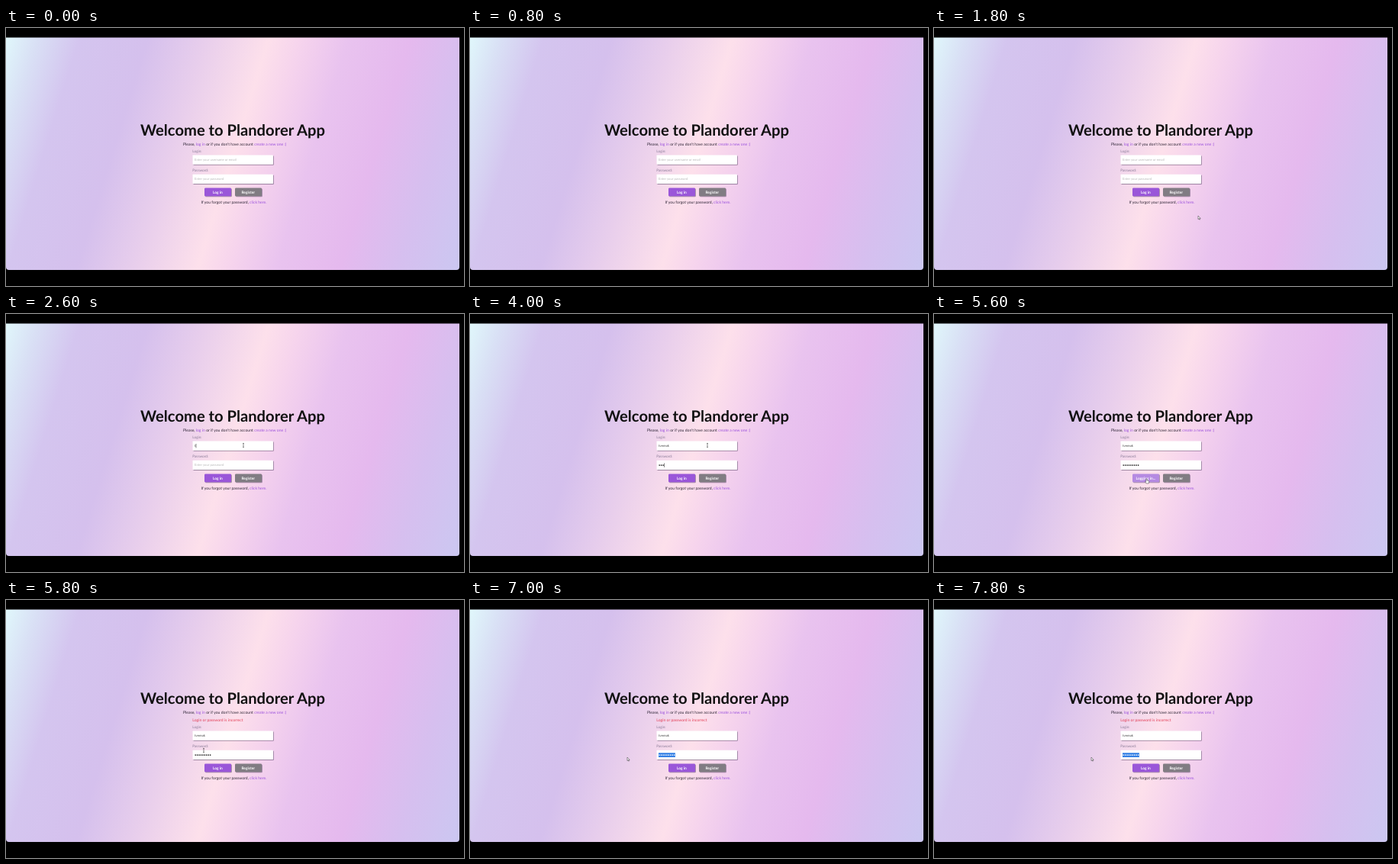
These frames come from a looping animation (600 by 338 pixels, 8000 ms). An HTML page:

```html
<!DOCTYPE html>
<html lang="en">
<head>
<meta charset="utf-8">
<title>Login form</title>
<style>
html, body { margin: 0; width: 100%; height: 100%; overflow: hidden; background: #000; }
svg { display: block; width: 100vw; height: 100vh; }
text { font: 5.08px Lato, sans-serif; fill: #2b2233; text-rendering: geometricPrecision; white-space: pre; }
.title { font-size: 20.2px; font-weight: 700; fill: #111; text-anchor: middle; }
.link { fill: #9a4fdc; }
.label { font-size: 4.7px; fill: #8b7c98; }
.hint { font-size: 4.27px; fill: #b8b8b8; }
.value { font-size: 4.27px; fill: #444; }
.btn { font-size: 4.9px; font-weight: 700; fill: #fff; text-anchor: middle; }
.error { fill: #e23a52; }
</style>
</head>
<body>
<svg viewBox="0 0 600 338">
  <defs>
    <linearGradient id="sky" gradientUnits="userSpaceOnUse" x1="0" y1="12" x2="629.5" y2="207.1">
      <stop offset="0" stop-color="#e0f7fb"/>
      <stop offset=".06" stop-color="#d9e0f5"/>
      <stop offset=".14" stop-color="#d4c5ef"/>
      <stop offset=".27" stop-color="#d5c0ed"/>
      <stop offset=".38" stop-color="#e8ceec"/>
      <stop offset=".5" stop-color="#fde0eb"/>
      <stop offset=".56" stop-color="#f6d4ed"/>
      <stop offset=".65" stop-color="#e9c3ef"/>
      <stop offset=".77" stop-color="#e5b9ee"/>
      <stop offset=".88" stop-color="#d6bfef"/>
      <stop offset="1" stop-color="#cbc7f1"/>
    </linearGradient>
    <filter id="shade" x="-10%" y="-30%" width="120%" height="180%">
      <feDropShadow dx=".8" dy=".9" stdDeviation=".7" flood-color="#332244" flood-opacity=".5"/>
    </filter>
  </defs>
  <rect width="600" height="338"/>
  <path d="M0 12.5H594V313a4 4 0 0 1-4 4H4a4 4 0 0 1-4-4z" fill="url(#sky)"/>

  <g id="head">
    <text class="title" x="297" y="141">Welcome to Plandorer App</text>
    <text x="232" y="153.6">Please, <tspan class="link">log in</tspan> or if you don't have account <tspan class="link">create a new one :)</tspan></text>
  </g>
  <text id="error" class="error" x="244.3" y="158.6">Login or password is incorrect</text>

  <g id="form">
    <text class="label" x="244.3" y="162.8">Login:</text>
    <rect x="244.5" y="166.5" width="105.5" height="12.3" rx=".8" fill="#fff" filter="url(#shade)"/>
    <text id="login" x="247" y="174.2"></text>
    <text class="label" x="244.3" y="188">Password:</text>
    <rect x="244.5" y="191.8" width="105.5" height="12.3" rx=".8" fill="#fff" filter="url(#shade)"/>
    <text id="passHint" class="hint" x="247" y="199.4">Enter your password</text>
    <rect id="select" y="195.3" height="5.6" fill="#2b7be4"/>
    <g id="dots"></g>
    <rect id="caret" width=".5" height="5.4" fill="#111"/>
    <rect id="logBtn" x="260" y="209.5" width="35" height="10.8" rx="1.3" filter="url(#shade)"/>
    <text id="logText" class="btn" x="277.4" y="216.7"></text>
    <rect id="regBtn" x="300" y="209.5" width="35" height="10.8" rx="1.3" filter="url(#shade)"/>
    <text id="regText" class="btn" x="317.3" y="216.7">Register</text>
    <text x="255.6" y="229.7">If you forgot your password, <tspan class="link">click here.</tspan></text>
  </g>

  <g id="pointer" stroke-linejoin="round">
    <path id="arrow" d="M0 0V4.6L1.1 3.6 1.8 5.2 2.5 4.9 1.8 3.4H3.2z" fill="#fff" stroke="#222" stroke-width=".45"/>
    <path id="beam" d="M-1-2.6Q0-2.6 0-2.1Q0-2.6 1-2.6M0-2.1V2.1M-1 2.6Q0 2.6 0 2.1Q0 2.6 1 2.6" fill="none" stroke="#222" stroke-width=".55"/>
    <path id="hand" d="M-.6 0Q0-.7.6 0V2L2.9 2.6Q3.4 2.8 3.3 3.4L2.7 6H-.4L-2 3.6Q-1.6 2.8-.6 3.5z" fill="#fff" stroke="#222" stroke-width=".45"/>
  </g>
</svg>
<script>
const LOOP = 8000, STEP = 200;
const USER = 'tvemok', DOT_GAP = 2.43, TEXT_X = 247;
const FAIL_AT = 5800, CLICK_AT = 5400;

// time, x, y
const PATH = [
  [1600, 372, 306], [2000, 320, 186], [2200, 311, 172], [4400, 311, 172],
  [4800, 302, 216], [5000, 285, 216], [5200, 279, 216], [5600, 278.5, 216],
  [5800, 259, 197], [6200, 277, 203], [6400, 277, 203], [7000, 206, 206]
];

const el = {};
document.querySelectorAll('[id]').forEach(n => el[n.id] = n);
const set = (n, attrs) => { for (const k in attrs) n.setAttribute(k, attrs[k]); };
const show = (n, on) => set(n, { visibility: on ? 'visible' : 'hidden' });
const clamp = (v, lo, hi) => Math.max(lo, Math.min(hi, v));

const dots = Array.from({ length: 9 }, (_, i) => {
  const dot = document.createElementNS('http://www.w3.org/2000/svg', 'circle');
  set(dot, { cx: TEXT_X + 1.2 + i * DOT_GAP, cy: 198.1, r: .85 });
  return el.dots.appendChild(dot);
});

function pointerAt(t) {
  const next = PATH.findIndex(p => p[0] > t);
  if (next < 0) return PATH[PATH.length - 1].slice(1);
  if (next === 0) return PATH[0].slice(1);
  const [t0, x0, y0] = PATH[next - 1], [t1, x1, y1] = PATH[next];
  const k = (t - t0) / (t1 - t0);
  return [x0 + (x1 - x0) * k, y0 + (y1 - y0) * k];
}

function draw(t) {
  const failed = t >= FAIL_AT, shift = failed ? 5 : 0;
  set(el.head, { transform: `translate(0 ${-shift})` });
  set(el.form, { transform: `translate(0 ${shift})` });
  show(el.error, failed);

  const [x, y] = pointerAt(t), fy = y - shift;
  const within = (left, top, w, h) => x >= left && x <= left + w && fy >= top && fy <= top + h;
  const overField = within(244, 166, 106, 13) || within(244, 191, 106, 14);
  const overLog = within(260, 209, 35, 11), overReg = within(300, 209, 35, 11);
  const kind = overField ? 'beam' : overLog || overReg ? 'hand' : 'arrow';
  set(el.pointer, { transform: `translate(${x} ${y})` });
  for (const k of ['arrow', 'beam', 'hand']) show(el[k], k === kind && t >= PATH[0][0]);

  const typed = clamp(Math.floor((t - 2600) / 200) + 1, 0, USER.length);
  el.login.textContent = typed ? USER.slice(0, typed) : 'Enter your username or email';
  set(el.login, { class: typed ? 'value' : 'hint' });

  const count = clamp(Math.floor((t - 3700) / 150) + 1, 0, dots.length);
  const end = TEXT_X + dots.length * DOT_GAP;
  const from = t > 6400 ? clamp(x, TEXT_X, end) : end;
  dots.forEach((d, i) => {
    show(d, i < count);
    set(d, { fill: +d.getAttribute('cx') > from ? '#fff' : '#222' });
  });
  show(el.passHint, !count);
  set(el.select, { x: from, width: end - from });

  const inLogin = t < 3700;
  const caretX = inLogin
    ? TEXT_X + (typed ? el.login.getComputedTextLength() : 0)
    : TEXT_X + count * DOT_GAP;
  set(el.caret, { x: caretX + .2, y: inLogin ? 170 : 195.4 });
  show(el.caret, t >= 2200 && t < CLICK_AT);

  const busy = t >= CLICK_AT && !failed;
  el.logText.textContent = busy ? 'Logging in...' : 'Log in';
  set(el.logBtn, { fill: overLog ? '#b58ae2' : '#9a57d9' });
  set(el.regBtn, { fill: overReg ? '#aaa4ac' : '#817c83' });
  set(el.regText, { opacity: overReg ? .7 : 1 });
}

const start = performance.now();
function tick() {
  const t = (performance.now() - start) % LOOP;
  draw(Math.floor(t / STEP) * STEP);
  requestAnimationFrame(tick);
}
tick();
</script>
</body>
</html>
```
